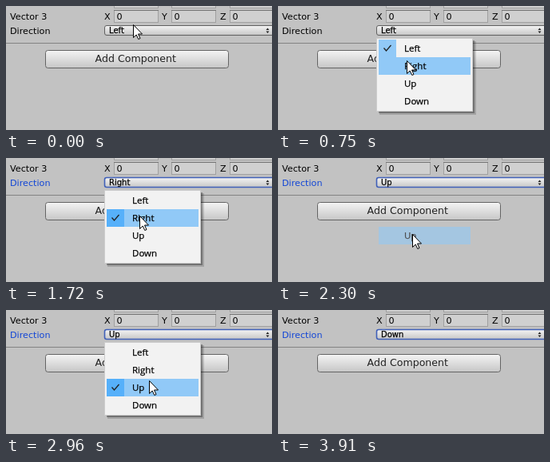
Animation of 333x155 px, one loop 4.44 s. Source, as an HTML page:

```html
<!DOCTYPE html>
<html lang="en">
<head>
<meta charset="utf-8">
<title>Direction dropdown</title>
<style>
  html, body { margin: 0; width: 100%; height: 100%; overflow: hidden; background: #c2c2c2; }
  svg { display: block; width: 333px; height: 155px; font: 11.2px "DejaVu Sans", sans-serif; }
  #menu, #ghost { font: 11.5px "Open Sans", sans-serif; }
  #menu text, #ghost text, #value { stroke: #000; stroke-width: .25px; }
</style>
</head>
<body>
<svg viewBox="0 0 333 155">
  <defs>
    <linearGradient id="raised" x2="0" y2="1">
      <stop stop-color="#f4f4f4"/><stop offset="1" stop-color="#c6c6c6"/>
    </linearGradient>
  </defs>
  <rect width="333" height="155" fill="#c2c2c2"/>
  <g id="fields"></g>
  <text x="5" y="17">Vector 3</text>
  <text id="label" x="5" y="35">Direction</text>
  <rect id="popup" x="123.5" y="24.5" width="220" height="12" rx="2.5" fill="url(#raised)"/>
  <text id="value" x="129" y="34" font-size="10"></text>
  <path d="M325.5 30l2-2.5 2 2.5zM325.5 31.5l2 2.5 2-2.5z" fill="#222"/>
  <path d="M0 46.5H333" stroke="#838383"/>
  <rect x="49.5" y="55.5" width="229" height="22" rx="3" fill="url(#raised)" stroke="#646464"/>
  <text x="111.5" y="70" font-size="12.6" fill="#222">Add Component</text>
  <g id="shadow" fill="none" stroke="#000">
    <path d="M246 44V134H127" stroke-width="4" opacity=".16"/>
    <path d="M245 43V133H126" stroke-width="2" opacity=".3"/>
  </g>
  <g id="menu"></g>
  <g id="ghost"></g>
  <path id="cursor" d="M.5 .5V16.5L4.2 13 6.8 18.5 9 17.5 6.5 12H11.5Z" fill="#fff" stroke="#000"/>
</svg>
<script>
const $ = id => document.getElementById(id);
const OPTIONS = ["Left", "Right", "Up", "Down"];
const LOOP = 4440;
const TICK = 135; // the screen updates in steps of this many ms
const ROW = 22, MENU_TOP = 42;

// all times below are in ticks
const OPENS = [3, 11.1, 20];
const PICKS = [9, 17, 27]; // each pick selects the next option
const PATH = [ // time, x, y of the cursor
  [0, 159, 23], [3, 163, 31], [6, 161, 68], [8, 162, 68], [11, 169, 34],
  [13, 167, 72], [14, 167, 90], [17, 168, 95], [20, 178, 35],
  [22, 179, 88], [25, 179, 116], [27, 179, 116], [28, 215, 125],
];

const clamp = v => Math.max(0, Math.min(1, v));
const smooth = u => u * u * (3 - 2 * u);

function cursorAt(n) {
  const next = PATH.findIndex(key => key[0] >= n);
  if (next < 0) return null;
  const [t1, x1, y1] = PATH[next];
  const [t0, x0, y0] = PATH[Math.max(0, next - 1)];
  const u = t1 > t0 ? smooth((n - t0) / (t1 - t0)) : 1;
  return [Math.round(x0 + (x1 - x0) * u), Math.round(y0 + (y1 - y0) * u)];
}

const field = (x, y) =>
  `<rect x="${x + .5}" y="${y + .5}" width="55" height="15" fill="#d0d0d0" stroke="#a0a0a0"/>
   <path d="M${x} ${y + .5}h56" stroke="#757575"/>`;

$("fields").innerHTML = ["X", "Y", "Z"].map((name, i) => {
  const x = 135 + Math.floor(72.5 * i);
  return field(x, -13) + field(x, 5) +
    `<text x="${x - 12}" y="17">${name}</text><text x="${x + 3.5}" y="17">0</text>`;
}).join("");

function row(i, hovered, checked) {
  const y = MENU_TOP + ROW * i;
  let out = "";
  if (hovered) out += `<rect x="126" y="${y}" width="115" height="${ROW}" fill="#91c9f7"/>`;
  if (checked) out +=
    `<rect x="126" y="${y}" width="22" height="${ROW}" fill="${hovered ? "#56b0fa" : "#91c9f7"}"/>
     <path d="M132.5 ${y + 10.5}l3 3.5 6-7" fill="none" stroke="#222" stroke-width="1.3"/>`;
  return out + `<text x="158" y="${y + 15}">${OPTIONS[i]}</text>`;
}

function draw(n) {
  const picked = PICKS.filter(time => time <= n).length;
  const sinceOpen = n - OPENS[picked];
  const opacity = sinceOpen >= 0 ? clamp(.25 + .4 * sinceOpen) : 0;
  const ghost = picked ? clamp(.6 - .5 * (n - PICKS[picked - 1])) : 0;
  const cursor = cursorAt(n);
  const hover = opacity === 1 ? Math.floor((cursor[1] - MENU_TOP) / ROW) : -1;

  $("label").setAttribute("fill", picked ? "#1246d6" : "#000");
  $("popup").setAttribute("stroke", picked ? "#4060b8" : "#606060");
  $("popup").setAttribute("stroke-width", picked ? 1.6 : 1);
  $("value").textContent = OPTIONS[picked];

  $("shadow").style.display = opacity ? "" : "none";
  $("menu").style.opacity = opacity;
  $("menu").innerHTML =
    `<rect x="123.5" y="40.5" width="120" height="91" fill="#f2f2f2" stroke="#ccc"/>` +
    OPTIONS.map((_, i) => row(i, i === hover, i === picked)).join("");
  $("ghost").style.opacity = ghost;
  $("ghost").innerHTML = row(picked, true, false);

  $("cursor").style.display = cursor ? "" : "none";
  if (cursor) $("cursor").setAttribute("transform", `translate(${cursor})`);
}

function tick() {
  const t = performance.now() % LOOP;
  draw(Math.floor((t + 60) / TICK));
  requestAnimationFrame(tick);
}
tick();
</script>
</body>
</html>
```
